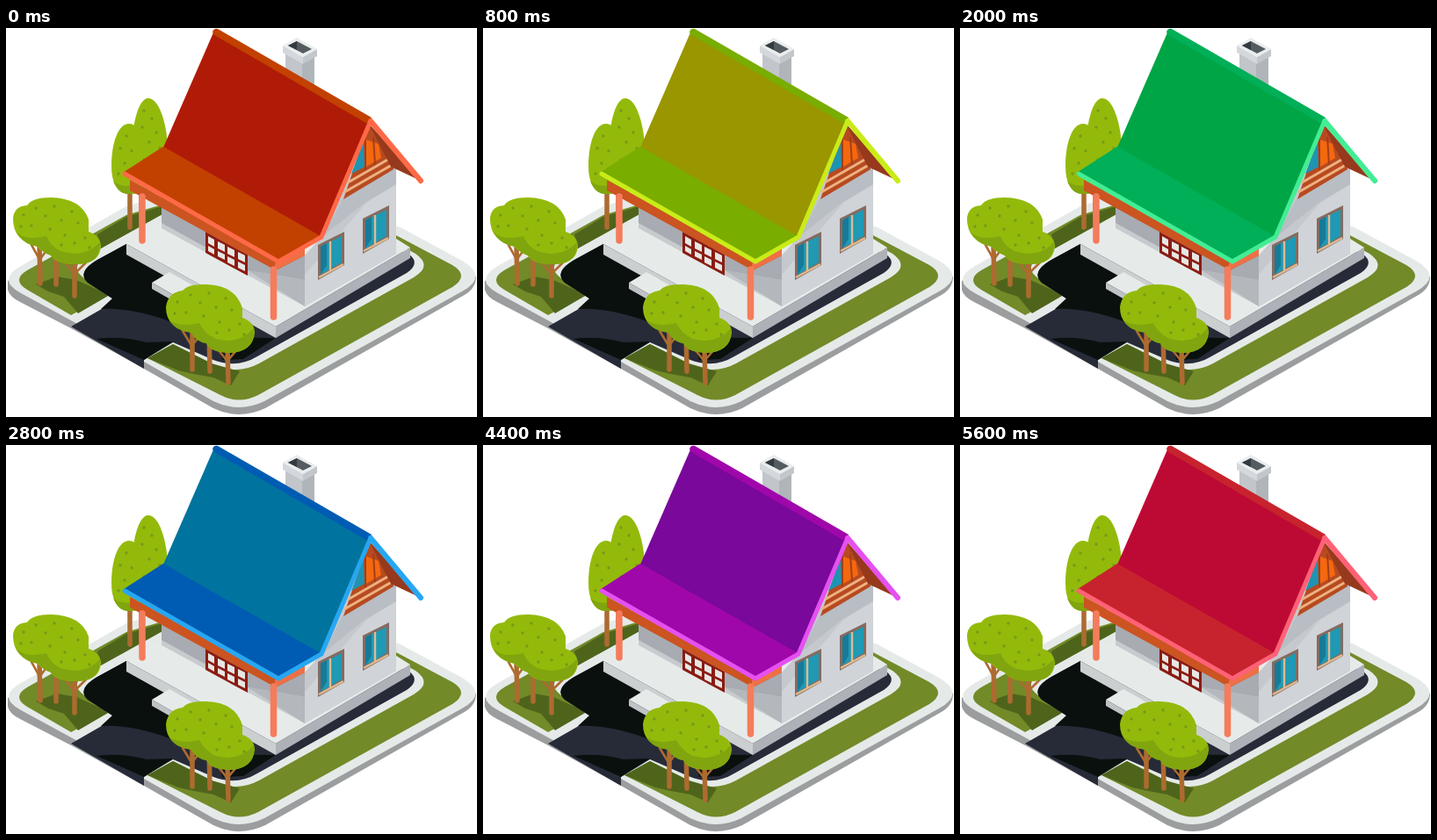
Write an HTML page that moves like this. It is 536 px wide and 443 px high and loops after 6000 ms.

```html
<!DOCTYPE html>
<html lang="en">
<head>
<meta charset="utf-8">
<title>House with a changing roof</title>
<style>
html, body { margin: 0; width: 100%; height: 100%; overflow: hidden; background: #fff; }
svg { display: block; width: 100vw; height: 100vh; }
.main { fill: var(--main); }
.eave { fill: var(--eave); }
.trim { fill: none; stroke: var(--trim); stroke-linejoin: round; stroke-linecap: round; }
.leaf { fill: #93ba0b; }
.shade { fill: #81a50e; }
.dots { fill: none; stroke: #789817; stroke-width: 3.4; stroke-linecap: round; }
.trunk { fill: none; stroke: #ad6b30; stroke-width: 5.5; stroke-linecap: round; }
.twig { fill: none; stroke: #ad6b30; stroke-width: 2.6; stroke-linecap: round; }
.grass { fill: #728a28; }
.dark { fill: #4f641b; }
.curb { fill: #e5eae9; }
.post { fill: none; stroke: #f57c5b; stroke-width: 7.5; stroke-linecap: round; }
</style>
</head>
<body>
<svg viewBox="0 0 536 443" preserveAspectRatio="none">
  <!-- ground -->
  <path fill="#9b9d9e" d="M2 288V298Q4 306 16 312L74 342L157 388L236 433Q265 447 295 433L520 305Q535 297 535 283L440 270L100 250Z"/>
  <path class="curb" d="M17 271L137 203L180 190L447 226L519 265Q550 283 519 300L294 425Q265 439 236 425L157 380L74 333L17 302Q-11 287 17 271Z"/>
  <path class="grass" d="M24 276L137 213L178 201V212L90 261Q72 273 89 285L112 299Q118 303 112 307L74 327L24 298Q6 287 24 276Z"/>
  <path class="dark" d="M104 235L137 215L178 203V212L108 251ZM34 292L58 283L80 287L118 304L82 325L66 306L48 300Z"/>
  <path class="grass" d="M440 234L508 270Q528 282 508 295L287 418Q265 429 244 418L161 376L190 360L234 382Q262 396 288 382L464 284Q486 271 466 257L440 243Z"/>
  <path class="dark" d="M161 376L190 360L234 382L266 391L256 407L236 398L214 394L196 390Z"/>
  <path fill="#272b38" d="M137 246L104 264Q80 278 93 290L121 308L121 313L74 340L157 388V378L190 358L236 378Q263 388 286 374L456 279Q472 268 459 258L440 250Z"/>
  <path fill="#0a100e" d="M137 246L104 264Q80 278 93 290L121 308L108 320Q142 318 186 334L205 322L230 300ZM103 354Q130 350 160 358L190 357L157 378Z"/>
  <path fill="#0a100e" d="M240 352L307 353L270 377L246 378Z"/>

  <!-- back trees -->
  <path class="trunk" d="M141 174V227M154 175V222"/>
  <path class="leaf" d="M162 80C176 80 186 118 184 150Q181 188 160 188Q142 184 143 145C143 112 150 80 162 80Z"/>
  <path class="leaf" d="M140 109C154 109 163 137 160 164Q157 189 138 189Q120 185 120 157C120 130 128 109 140 109Z"/>
  <path class="shade" d="M122 174Q128 190 140 189L165 188Q178 184 182 168Q168 183 146 179Q130 182 122 174Z"/>
  <path class="dots" d="M157 94h0M166 103h0M155 113h0M171 119h0M163 130h0M175 137h0M137 123h0M130 137h0M143 140h0M135 154h0M128 166h0M146 164h0M157 150h0"/>

  <!-- platform and walls -->
  <path fill="#e6ebea" d="M137 246L180 220L420 225L460 250L307 340Z"/>
  <path fill="#cbcfd0" d="M137 246L307 340V353L137 258Z"/>
  <path fill="#aeb1b7" d="M307 340L460 250V262L307 353Z"/>
  <path fill="#e6ebea" d="M166 290L186 278L230 303L210 315Z"/>
  <path fill="#bfc3c6" d="M166 290L210 315V322L166 297Z"/>
  <path fill="#c7cbce" d="M177 180L340 255V317L177 228Z"/>
  <path fill="#a8abb2" d="M177 180L340 255V287L275 276L177 222Z"/>
  <path fill="#b4b7bc" d="M275 276L340 287V317Z"/>
  <path fill="#8a1c13" d="M227 232L275 258V282L227 256Z"/>
  <path fill="#e6e7e4" d="M230 237l7 4v8l-7-4zM241 243l8 4v8l-8-4zM252 249l8 4v8l-8-4zM264 255l8 4v8l-8-4zM230 248l7 4v6l-7-4zM241 254l8 4v6l-8-4zM252 260l8 4v7l-8-4zM264 266l8 4v7l-8-4z"/>
  <path fill="#c5c8cd" d="M340 317V259L359 238L413 112L444 158V257Z"/>
  <path fill="#d0d3d7" d="M340 281L410 199L444 178V257L340 317Z"/>
  <path fill="#b9bdc4" d="M362 235L384 193L444 159V178L408 199L362 236Z"/>

  <!-- side windows -->
  <g id="win">
    <path fill="#846b61" d="M355 247L385 232V270L355 287Z"/>
    <path fill="#1f99b4" d="M358 249L382 237V267L358 281Z"/>
    <path fill="#167a98" d="M358 249L365 245V270L358 281Z"/>
    <path fill="none" stroke="#dfba91" stroke-width="2.4" d="M369 243V277M356 284L384 269"/>
  </g>
  <use href="#win" x="51" y="-30"/>

  <!-- gable -->
  <path fill="#b74a20" d="M413 109L384 195L441 161L439 148Z"/>
  <path fill="#1f94b2" d="M407 130L393 166L408 158Z"/>
  <path fill="#f4680f" d="M410 127L424 132L427 148L410 158Z"/>
  <path fill="none" stroke="#a63d18" stroke-width="2" d="M409 122V162M418 124L420 156"/>
  <path fill="none" stroke="#eeb181" stroke-width="3" d="M389 176L436 149M385 187L439 156"/>
  <path fill="#96391c" d="M413 109L472 174L438 158L424 131Z"/>

  <!-- chimney -->
  <path fill="#c2c5ca" d="M318 28L337 38V68L318 56Z"/>
  <path fill="#b0b5b9" d="M337 38L351 30V72L337 66Z"/>
  <path fill="#d4d7db" d="M315 20L338 33V41L315 28Z"/>
  <path fill="#c3c7cc" d="M338 33L354 24V32L338 41Z"/>
  <path fill="#e9edee" d="M315 20L331 11L354 24L338 33Z"/>
  <path fill="#555c61" d="M321 20L331 15L348 24L338 29Z"/>
  <path fill="#343a3f" d="M321 20L331 15V25Z"/>

  <!-- roof and porch -->
  <path fill="#cb5421" d="M141 173L309 264L340 250V259L307 276L141 185Z"/>
  <path fill="#ef7046" d="M306 268L340 251V259L306 276Z"/>
  <path class="post" d="M155 192V242M304.500 275V329"/>
  <path class="main" d="M237 3L415 106L358 238L179 136Z"/>
  <path class="eave" d="M179 135L358 237L310 265L134 164Z"/>
  <path class="eave" d="M235 5Q236 0 241 1L416 102L413 110L237 8Z"/>
  <path class="trim" stroke-width="5" d="M135 166L310 266L359 238L414 108"/>
  <path class="trim" stroke-width="6" d="M415 106L472 174"/>

  <!-- front left trees -->
  <path class="trunk" d="M38 246L39 291M57 250V292M78 262V305"/>
  <path class="twig" d="M39 265L29 247M39 263L49 249M78 281L67 267M78 280L91 267"/>
  <path class="leaf" d="M8 217Q9 203 24 202Q30 193 51 193Q86 194 94 218V232Q108 237 108 249Q106 269 80 269Q56 269 51 259Q39 254 36 249Q8 243 8 217Z"/>
  <path class="shade" d="M12 232Q22 243 46 237Q50 248 62 254Q89 263 107 244Q108 269 80 269Q57 269 51 259Q42 256 37 249Q20 247 12 232Z"/>
  <path class="dots" d="M20 213h0M29 225h0M34 205h0M45 214h0M55 203h0M63 219h0M75 209h0M82 222h0M50 229h0M67 236h0M78 245h0M90 239h0M95 250h0M63 247h0M17 226h0"/>

  <!-- front right trees -->
  <path class="trunk" d="M212 343V389M231 342L232 391M252 366L253 404"/>
  <path class="twig" d="M212 363L201 345M213 360L223 347M232 363L226 348M253 381L242 367M253 378L264 365"/>
  <path class="leaf" d="M182 318Q184 301 201 299Q207 291 228 292Q261 293 269 319V330Q283 335 283 347Q281 369 254 370Q232 369 228 359Q216 357 211 347Q182 342 182 318Z"/>
  <path class="shade" d="M186 333Q199 341 220 336Q226 348 239 354Q265 361 282 342Q284 369 254 370Q232 369 228 359Q216 357 211 347Q193 345 186 333Z"/>
  <path class="dots" d="M195 312h0M205 324h0M210 304h0M221 313h0M231 302h0M239 318h0M250 308h0M257 321h0M225 328h0M243 335h0M254 344h0M266 337h0M271 349h0M240 347h0M192 325h0"/>
</svg>
<script>
const LOOP = 6000, STEP = 400;
const stops = [0, 2, 4, 7, 9, 11, 14, 15];
// hue, saturation and lightness of each roof part at the stops
const tones = {
  main: [[7, 59, 120, 196, 241, 286, 346, 367], [92, 100, 100, 100, 95, 90, 90, 92], [36, 30, 33, 31, 33, 32, 39, 36]],
  eave: [[20, 78, 120, 209, 249, 296, 356, 380], [100, 100, 100, 100, 92, 92, 70, 100], [38, 34, 34, 35, 35, 35, 46, 38]],
  trim: [[11, 70, 122, 202, 252, 296, 352, 371], [100, 85, 80, 88, 82, 84, 100, 100], [64, 51, 62, 55, 64, 63, 69, 64]]
};
const style = document.documentElement.style;
let shown = -1;

function paint(step) {
  const i = stops.findIndex(s => s > step) - 1;
  const k = (step - stops[i]) / (stops[i + 1] - stops[i]);
  for (const part in tones) {
    const [h, s, l] = tones[part].map(v => v[i] + (v[i + 1] - v[i]) * k);
    style.setProperty('--' + part, `hsl(${h % 360} ${s}% ${l}%)`);
  }
}

function tick() {
  const step = Math.floor(performance.now() % LOOP / STEP);
  if (step !== shown) paint(shown = step);
  requestAnimationFrame(tick);
}
tick();
</script>
</body>
</html>
```
